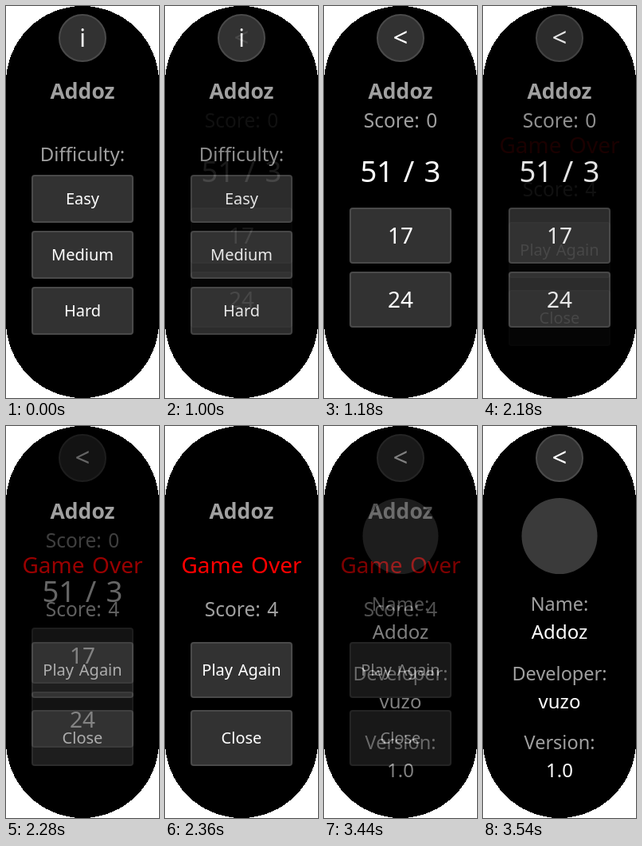
Animation of 192 by 490 pixels, one loop 4.54 s. Source, as an HTML page:

```html
<!DOCTYPE html>
<html lang="en">
<head>
<meta charset="utf-8">
<title>Arithmetic quiz</title>
<style>
  html, body { margin: 0; width: 100%; height: 100%; overflow: hidden; background: #fff; }
  svg { display: block; width: 100vw; height: 100vh; }
  text { font-family: "Noto Sans", sans-serif; text-anchor: middle; word-spacing: 0.08em; }
  .panel { fill: #323232; stroke: #4a4a4a; stroke-width: 2; }
</style>
</head>
<body>
<svg id="stage" viewBox="0 0 192 490"></svg>
<script>
const HOLD = 1000, STEP = 20, STEPS = 10;
const SCENE = HOLD + (STEPS - 1) * STEP;
const GREY = '#a0a0a0', WHITE = '#fff';

const label = (text, baseline, size, fill = WHITE, weight = 400) =>
  `<text x="96" y="${baseline}" font-size="${size}" fill="${fill}" font-weight="${weight}">${text}</text>`;

const title = label('Addoz', 116, 26.5, GREY, 600);

const button = (text, top, height, size) =>
  `<rect class="panel" x="33" y="${top + 1}" width="126" height="${height - 2}" rx="3"/>` +
  label(text, top + height / 2 + size * 0.36, size);

const roundButton = (text, baseline, size) =>
  `<circle class="panel" cx="96" cy="40" r="29"/>` + label(text, baseline, size);

const backButton = roundButton('&lt;', 50.5, 33);

const field = (name, value, baseline) =>
  label(name, baseline, 23.5, GREY) + label(value, baseline + 35, 24);

const scenes = [
  // Difficulty menu
  roundButton('i', 51, 30) + title + label('Difficulty:', 194, 24, GREY) +
    button('Easy', 211, 60, 20) + button('Medium', 281, 60, 20) + button('Hard', 351, 60, 20),
  // Question
  backButton + title + label('Score: 0', 152, 24.5, GREY) + label('51 / 3', 220, 36.5) +
    button('17', 252, 70, 28) + button('24', 332, 70, 28),
  // Game over
  title + label('Game Over', 184, 28, '#f00') + label('Score: 4', 238, 24.5, GREY) +
    button('Play Again', 270, 70, 20) + button('Close', 355, 70, 20),
  // About
  backButton + '<circle cx="96" cy="137.5" r="47.5" fill="#3a3a3a"/>' +
    field('Name:', 'Addoz', 231) + field('Developer:', 'vuzo', 318) + field('Version:', '1.0', 404)
];
const LOOP = (scenes.length - 1) * SCENE + HOLD;

const stage = document.getElementById('stage');
stage.innerHTML = scenes.map(content =>
  `<g><rect width="192" height="490" rx="96" shape-rendering="crispEdges"/>${content}</g>`).join('');
const layers = [...stage.children];

function draw(now) {
  const time = now % LOOP;
  const current = Math.floor(time / SCENE);
  const fadeTime = time % SCENE - HOLD;
  const fade = fadeTime < 0 ? 0 : (Math.floor(fadeTime / STEP) + 1) / STEPS;

  layers.forEach((layer, i) => {
    const opacity = i === current ? 1 : i === current + 1 ? fade : 0;
    layer.style.display = opacity ? '' : 'none';
    layer.style.opacity = opacity;
  });
}

const start = performance.now();
function tick() {
  draw(performance.now() - start);
  requestAnimationFrame(tick);
}
tick();
</script>
</body>
</html>
```
